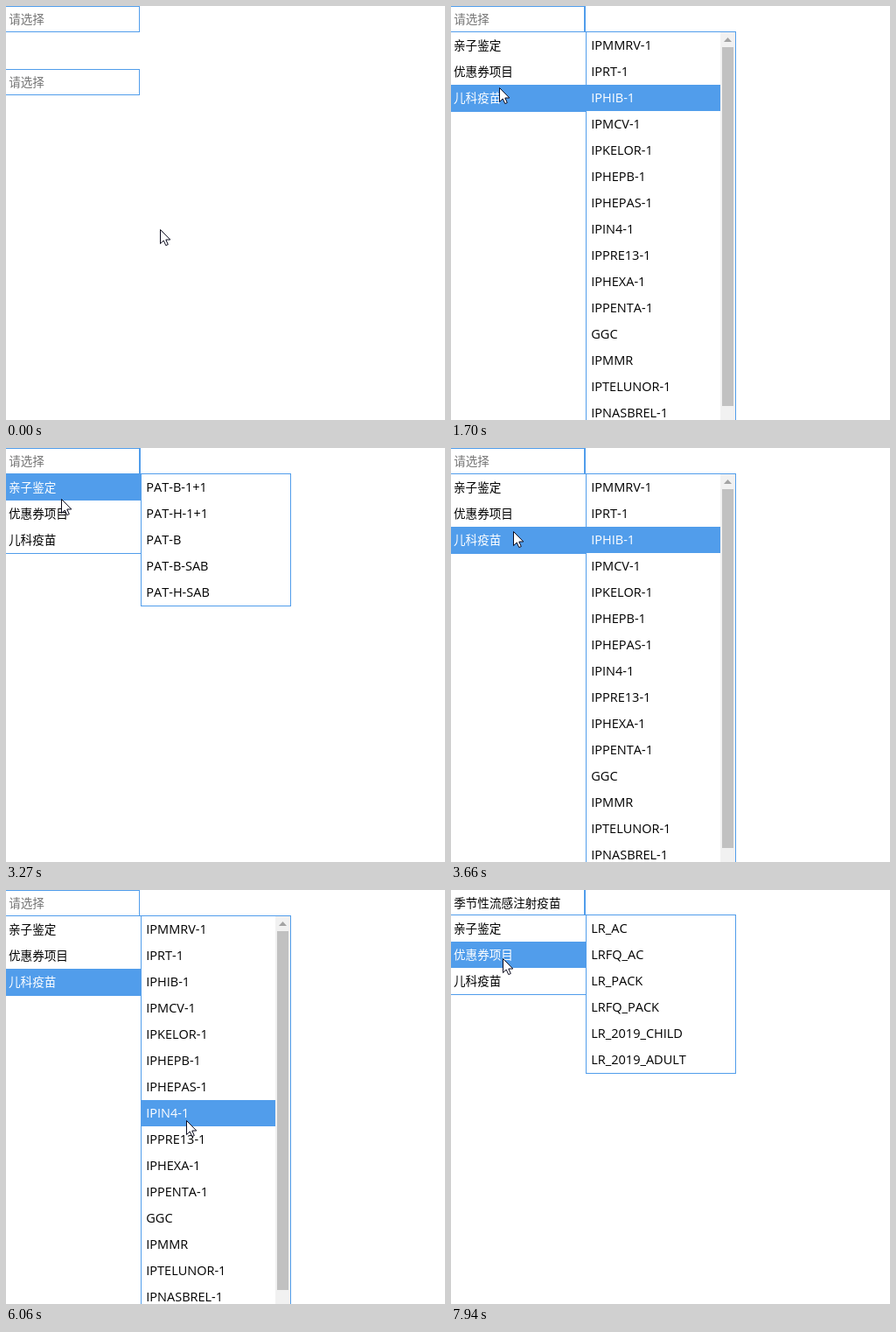
Recreate the animation shown at these times as an HTML page. Size 502x473 px, loop 8000 ms.

```html
<!DOCTYPE html>
<html lang="zh-CN">
<head>
<meta charset="utf-8">
<style>
html, body { margin: 0; width: 100%; height: 100%; overflow: hidden; background: #fff; }
body { position: relative; font: 13.6px/30px "Open Sans", "Noto Sans CJK SC", "Noto Sans CJK", sans-serif; font-kerning: none; color: #000; }
div, svg { position: absolute; box-sizing: border-box; white-space: nowrap; }
.input { left: -2px; width: 155px; height: 30px; padding-left: 4.2px; line-height: 27px; border: 1px solid #519deb; color: #757575; }
.input.focus { box-shadow: 1px 0 #519deb; }
.input.filled { top: -1px !important; line-height: 29px; color: #000; }
.menu { background: #fff; border: 1px solid #519deb; }
.menu p { margin: 0; height: 30px; }
.menu p.on { background: #519deb; color: #fff; }
#list { left: -1px; width: 156px; }
#list p { padding-left: 3px; }
#sub { left: 154px; width: 172px; font-size: 14.5px; }
#sub p { padding-left: 5.3px; }
#bar { right: 0; top: 0; width: 17px; height: 460px; background: #f1f1f1; }
#bar div { left: 2px; top: 17px; width: 13px; height: 410px; background: #c1c1c1; }
#bar svg { left: 4px; top: 6px; }
#tip { height: 22px; padding: 0 5.5px; border: 1px solid #767676; border-radius: 3px; background: linear-gradient(#fff, #e4e5f0); font-size: 12px; line-height: 20px; color: #575757; }
#cursor { left: 0; top: 0; overflow: visible; }
</style>
</head>
<body>
<div class="input" id="first" style="top:0"></div>
<div class="input" style="top:72px">请选择</div>
<div class="menu" id="list"></div>
<div class="menu" id="sub"></div>
<div id="tip"></div>
<svg id="cursor" width="1" height="1">
  <path id="arrow" d="M.5.5V16.6L4.2 13 6.8 18.6 9.3 17.5 6.8 12H11.8Z" fill="#fff" stroke="#0b0b1e"/>
  <path id="beam" d="M-3-7.5H-.5M.5-7.5H3M0-7V7M-3 7.5H-.5M.5 7.5H3" fill="none" stroke="#000"/>
</svg>
<script>
const LOOP = 8000, ROW = 30;
const groups = [
  ['亲子鉴定', 'PAT-B-1+1 PAT-H-1+1 PAT-B PAT-B-SAB PAT-H-SAB'],
  ['优惠券项目', 'LR_AC LRFQ_AC LR_PACK LRFQ_PACK LR_2019_CHILD LR_2019_ADULT'],
  ['儿科疫苗', 'IPMMRV-1 IPRT-1 IPHIB-1 IPMCV-1 IPKELOR-1 IPHEPB-1 IPHEPAS-1 IPIN4-1 ' +
    'IPPRE13-1 IPHEXA-1 IPPENTA-1 GGC IPMMR IPTELUNOR-1 IPNASBREL-1']
];
const vaccine = '季节性流感注射疫苗';
const scrollbar = '<div id="bar"><div></div><svg width="9" height="6"><path d="M0 5 4.5 0 9 5Z" fill="#a3a3a3"/></svg></div>';

// Pointer moves: first step time, last step time, steps, x, y
const moves = [
  [70, 620, 8, 80, 22], [770, 770, 1, 63, 14],
  [1380, 1700, 5, 55, 93], [1780, 2090, 5, 58, 104],
  [2250, 2550, 5, 65, 9], [2720, 2790, 2, 67, 8],
  [2960, 3270, 5, 63, 58], [3350, 3660, 5, 71, 95], [3720, 3720, 1, 76, 99],
  [3810, 4120, 5, 168, 108], [4200, 4430, 4, 200, 226],
  [5360, 5510, 3, 206, 263],
  [6380, 6910, 8, 61, 20], [6990, 7140, 3, 63, 17],
  [7470, 7940, 7, 59, 78]
];

const el = id => document.getElementById(id);
const between = (t, a, b) => t >= a && t < b;
const show = (node, on) => node.style.display = on ? '' : 'none';
const rows = (names, active) => names.map((n, i) => `<p${i === active ? ' class="on"' : ''}>${n}</p>`).join('');

function setHtml(node, html) {
  if (node.source !== html) node.innerHTML = node.source = html;
}

function pointer(t) {
  let x = 176, y = 255;
  for (const [start, end, steps, tx, ty] of moves) {
    if (t < start) break;
    const gap = (end - start) / (steps - 1) || 1;
    const k = Math.min(1, (Math.floor((t - start) / gap + 1e-6) + 1) / steps);
    x += (tx - x) * k;
    y += (ty - y) * k;
  }
  return [Math.round(x), Math.round(y)];
}

function draw(t) {
  const [x, y] = pointer(t);
  const open = between(t, 920, 6380) || t >= 7300;
  const picked = t >= 6380;
  const top = picked ? 28 : 29;
  const row = Math.floor((y - top - 1) / ROW);
  const inSub = x >= 155;
  const group = !open || row < 0 ? -1 : inSub ? 2 : Math.min(row, 2);

  const first = el('first');
  first.textContent = picked ? vaccine : '请选择';
  first.classList.toggle('filled', picked);
  first.classList.toggle('focus', between(t, 920, 6060) || t >= 7230);

  const list = el('list'), sub = el('sub');
  show(list, open);
  show(sub, group >= 0);
  list.style.top = sub.style.top = top + 'px';
  list.style.borderBottomColor = '#519deb';
  setHtml(list, rows(groups.map(g => g[0]), group));
  if (group >= 0) {
    const active = inSub ? row : group === 2 ? 2 : -1;
    setHtml(sub, rows(groups[group][1].split(' '), active) + (group === 2 ? scrollbar : ''));
  }

  const tip = el('tip');
  const tipText = between(t, 4900, 5360) ? '儿童甲肝针' : between(t, 5890, 6060) ? vaccine : '';
  show(tip, tipText);
  tip.textContent = tipText;
  tip.style.left = x + 'px';
  tip.style.top = y + 20 + 'px';

  const overInput = x < 153 && (y < 29 || !open && between(y, 72, 102));
  show(el('beam'), overInput);
  show(el('arrow'), !overInput);
  el('cursor').style.transform = `translate(${x + (overInput ? .5 : 0)}px, ${y}px)`;
}

function frame() {
  draw(performance.now() % LOOP);
  requestAnimationFrame(frame);
}
frame();
</script>
</body>
</html>
```
